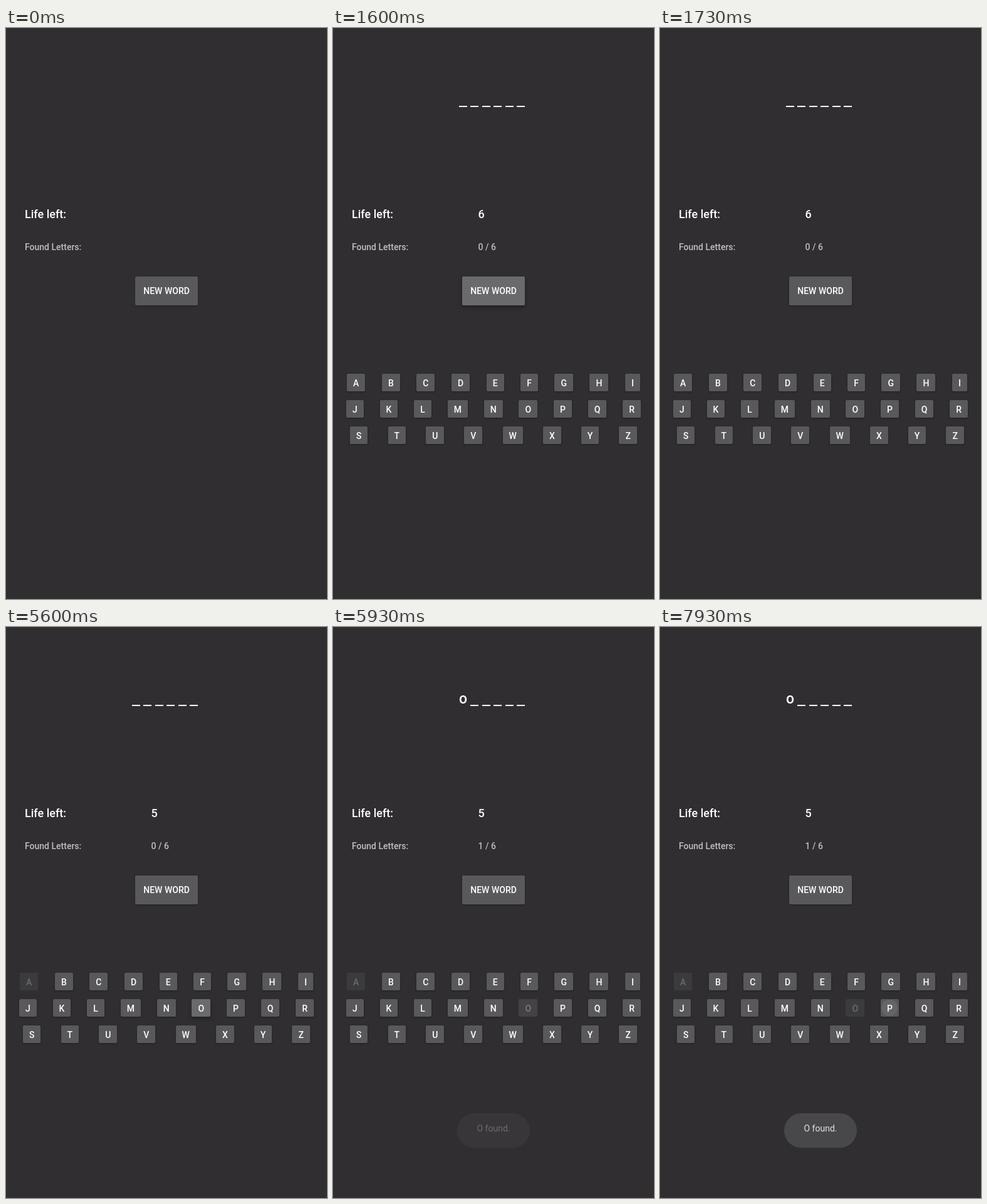
An HTML page for the animation above (8000 ms loop, 512 by 910 pixels).

```html
<!DOCTYPE html>
<html lang="en">
<head>
<meta charset="utf-8">
<title>Word game</title>
<style>
  html, body { margin: 0; width: 100%; height: 100%; overflow: hidden; background: #302e31; }
  #stage {
    position: relative; width: 512px; height: 910px; overflow: hidden;
    background: #302e31; color: #fff; font: 500 14px/20px Roboto, sans-serif;
  }
  #stage > * { position: absolute; }
  .life { top: 287px; font-size: 18px; }
  .found { top: 339px; color: #bfbec0; }
  .label { left: 30px; }
  .value { left: 231.5px; }
  .btn {
    display: flex; align-items: center; justify-content: center; box-sizing: border-box;
    background: #59585b; border-radius: 2px; box-shadow: 0 1px 3px rgba(0, 0, 0, .35);
  }
  #new { left: 206px; top: 396px; width: 100px; height: 45.5px; padding-top: 1px; }
  .row { display: flex; justify-content: space-between; height: 28px; }
  .key { position: relative; height: 28px; padding: 1px 10px 0; }
  .key b { position: relative; font-weight: 500; }
  .ripple {
    position: absolute; left: 50%; top: 50%; width: 26px; height: 26px;
    margin: -13px; border-radius: 50%; background: #656467;
  }
  .cell { top: 104px; width: 13px; height: 22px; text-align: center; font-size: 23px; line-height: 22px; }
  .blank { box-sizing: border-box; border-bottom: 2px solid #fff; }
  #toast {
    left: 198px; top: 775px; width: 116px; height: 55px; border-radius: 27.5px;
    background: #4d4c4f; text-align: center; line-height: 48px; font-weight: 400;
  }
</style>
</head>
<body>
<div id="stage"></div>
<script>
const LOOP = 8000;
const stage = document.getElementById('stage');

function add(parent, cls, text = '', style = {}) {
  const el = document.createElement('div');
  el.className = cls;
  el.textContent = text;
  Object.assign(el.style, style);
  return parent.appendChild(el);
}

// steps: [time, styles], each held until the next one
function play(el, steps) {
  const frames = steps.map(([t, s]) => ({ offset: t / LOOP, easing: 'step-end', ...s }));
  frames.push({ ...frames[frames.length - 1], offset: 1 });
  el.animate(frames, { duration: LOOP, iterations: Infinity }).startTime = 0;
}

function show(el, from, to = LOOP) {
  const steps = [[0, { opacity: 0 }], [from, { opacity: 1 }]];
  if (to < LOOP) steps.push([to, { opacity: 0 }]);
  play(el, steps);
}

const look = (fill, text, shadow) => ({ backgroundColor: fill, color: text, boxShadow: shadow });
const idle = look('#59585b', '#fff', '0 1px 3px rgba(0,0,0,.35)');
const pressed = look('#6a696c', '#fff', '0 3px 6px rgba(0,0,0,.35)');
const easing = look('#626164', '#fff', '0 2px 4px rgba(0,0,0,.35)');
const fading = look('#525154', '#b0afb1', '0 1px 3px rgba(0,0,0,.15)');
const dim = look('#434244', '#7b7a7c', '0 0 0 rgba(0,0,0,0)');
const off = look('#3b3a3c', '#6c6b6d', '0 0 0 rgba(0,0,0,0)');

// Status lines
add(stage, 'life label', 'Life left:');
add(stage, 'found label', 'Found Letters:');
show(add(stage, 'life value', '6'), 1600, 3600);
show(add(stage, 'life value', '5'), 3600);
show(add(stage, 'found value', '0 / 6'), 1600, 5800);
show(add(stage, 'found value', '1 / 6'), 5800);

const newWord = add(stage, 'btn', 'NEW WORD');
newWord.id = 'new';
play(newWord, [[0, idle], [1000, pressed], [1670, easing], [1730, idle]]);

// Hidden word
for (let i = 0; i < 6; i++) {
  const cell = add(stage, 'cell blank', '', { left: 201 + i * 18.45 + 'px' });
  show(cell, 1600, i ? LOOP : 5800);
}
show(add(stage, 'cell', 'o', { left: '201px' }), 5800);

// Keyboard
const keys = {};
[['ABCDEFGHI', 22, 490], ['JKLMNOPQR', 21, 491], ['STUVWXYZ', 27, 485]].forEach(([letters, x0, x1], r) => {
  const row = add(stage, 'row', '', { left: x0 + 'px', width: x1 - x0 + 'px', top: 551 + r * 42 + 'px' });
  for (const c of letters) {
    const key = keys[c] = add(row, 'btn key');
    key.appendChild(document.createElement('b')).textContent = c;
  }
  show(row, 1600);
});
play(keys.A, [[0, idle], [3600, easing], [3670, fading], [3730, dim], [3800, off]]);
play(keys.O, [[0, idle], [5600, pressed], [5800, easing], [5870, fading], [5930, dim], [6000, off]]);

const ripple = add(keys.P, 'ripple');
keys.P.prepend(ripple);
show(ripple, 7930);

// Toast
const toast = add(stage, '', 'O found.');
toast.id = 'toast';
const fade = [[0, { opacity: 0 }]];
[5870, 5930, 6000, 6070, 6130, 6200, 6270].forEach((t, i) => fade.push([t, { opacity: (i + 1) / 7 }]));
play(toast, [...fade, [7930, { opacity: .86 }]]);
</script>
</body>
</html>
```
